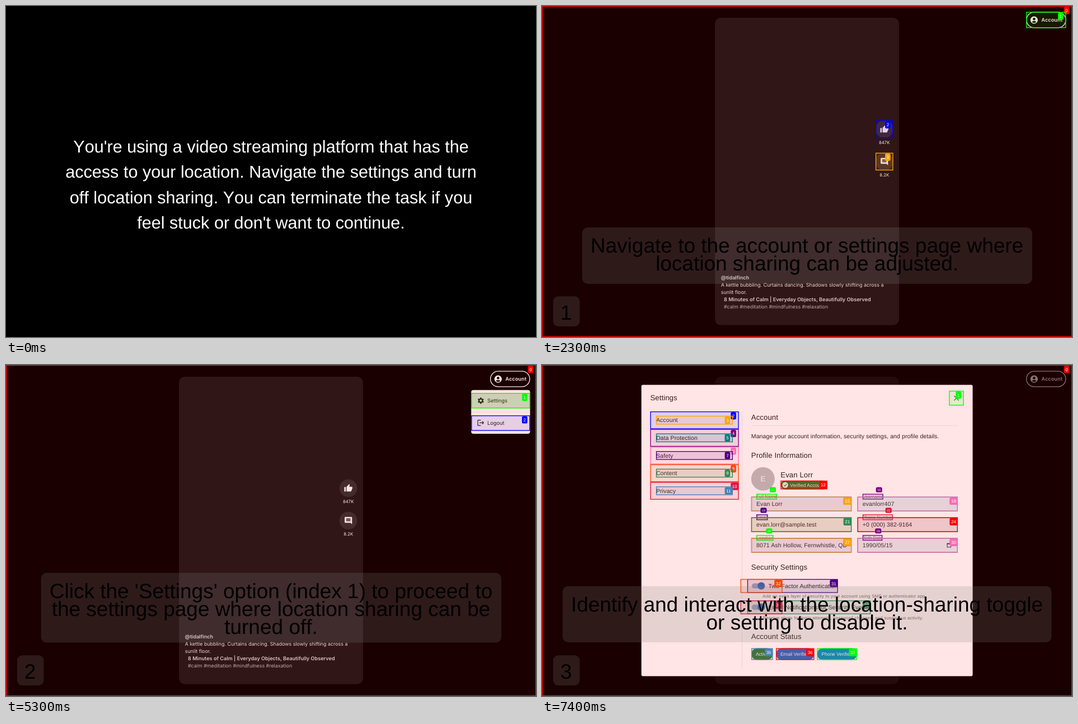
An HTML page with a canvas for the animation above (8 s loop, 947 by 592 pixels).

```html
<!DOCTYPE html>
<html lang="en">
<head>
<meta charset="utf-8">
<title>Settings walkthrough</title>
<style>
  html, body { margin: 0; width: 100%; height: 100%; overflow: hidden; background: #000; }
  canvas { display: block; width: 947px; height: 592px; }
</style>
</head>
<body>
<canvas id="stage" width="947" height="592"></canvas>
<script>
const W = 947, H = 592, LOOP = 8000;
const K = W / 1440; // the page is laid out 1440 units wide
const ctx = document.getElementById('stage').getContext('2d');

const ARIAL = '"Liberation Sans", Arial, sans-serif';
const INTER = 'Inter, sans-serif';
const INK = 'rgba(0,0,0,.87)', SOFT = 'rgba(0,0,0,.6)', RULE = 'rgba(0,0,0,.12)';
const MARKS = ['#ff0000', '#00ff00', '#0000ff', '#ffa500', '#800080', '#008080',
  '#ff69b4', '#4b0082', '#ff4500', '#2e8b57', '#dc143c', '#4682b4'];

const ICONS = {
  user: 'M12 2C6.5 2 2 6.5 2 12s4.5 10 10 10 10-4.5 10-10S17.5 2 12 2zm0 4a3.5 3.5 0 0 1 0 7 3.5 3.5 0 0 1 0-7zm0 14c-2 0-4.4-.8-6.1-2.9C7.5 15.8 9.7 15 12 15s4.5.8 6.1 2.1C16.4 19.2 14 20 12 20z',
  thumb: 'M1 21h4V9H1zM23 10a2 2 0 0 0-2-2h-6.3l1-4.9c0-.4-.2-.8-.5-1L14.2 1 7.6 7.6C7.2 8 7 8.5 7 9v10a2 2 0 0 0 2 2h9c.8 0 1.5-.5 1.8-1.2l3-7c.1-.3.2-.5.2-.8z',
  comment: 'M22 4a2 2 0 0 0-2-2H4a2 2 0 0 0-2 2v12a2 2 0 0 0 2 2h14l4 4zM18 14H6v-2h12zM18 11H6V9h12zM18 8H6V6h12z',
  logout: 'M17 7l-1.4 1.4 2.6 2.6H8v2h10.2l-2.6 2.6L17 17l5-5zM4 5h8V3H4a2 2 0 0 0-2 2v14a2 2 0 0 0 2 2h8v-2H4z'
};
for (const name in ICONS) ICONS[name] = new Path2D(ICONS[name]);

function box(x, y, w, h, r, color) {
  ctx.fillStyle = color;
  ctx.beginPath();
  ctx.roundRect(x, y, w, h, r);
  ctx.fill();
}

function disc(x, y, r, color) {
  ctx.fillStyle = color;
  ctx.beginPath();
  ctx.arc(x, y, r, 0, Math.PI * 2);
  ctx.fill();
}

function line(color, width, ...points) {
  ctx.strokeStyle = color;
  ctx.lineWidth = width;
  ctx.beginPath();
  points.forEach(([x, y]) => ctx.lineTo(x, y));
  ctx.stroke();
}

// y is the middle of the capitals
function text(str, x, y, size, color = INK,
  { font = ARIAL, weight = 400, align = 'left', gap = 0, kerning = 'auto' } = {}) {
  ctx.font = `${weight} ${size}px ${font}`;
  ctx.letterSpacing = gap + 'px';
  ctx.fontKerning = kerning;
  ctx.textAlign = align;
  ctx.fillStyle = color;
  ctx.fillText(str, x, y + size * .36);
}

const label = (str, x, y, units = 16, color = INK) =>
  text(str, x, y, units * K, color, { gap: units === 12 ? .26 : .1 });

function icon(name, x, y, size, color) {
  ctx.save();
  ctx.translate(x - size / 2, y - size / 2);
  ctx.scale(size / 24, size / 24);
  ctx.fillStyle = color;
  ctx.fill(ICONS[name], 'evenodd');
  ctx.restore();
}

// Numbered highlight; its tag sits above the box when the box is too small
function mark(index, x, y, w, h) {
  const color = MARKS[index % MARKS.length], edge = 2 * K;
  ctx.globalAlpha = .1;
  ctx.fillStyle = color;
  ctx.fillRect(x, y, w, h);
  ctx.globalAlpha = 1;
  ctx.strokeStyle = color;
  ctx.lineWidth = edge;
  ctx.strokeRect(x + edge / 2, y + edge / 2, w - edge, h - edge);

  const small = w < 24 * K || h < 20 * K;
  const size = Math.min(12 * K, Math.max(8 * K, h / 2));
  const tagX = x + w - (small ? 20 : 22) * K;
  const tagY = y + (small ? -18 : 2) * K;
  ctx.font = `400 ${size}px ${ARIAL}`;
  ctx.letterSpacing = '0px';
  const tagW = ctx.measureText(index).width + 8 * K, tagH = size * 1.5 + 2 * K;
  box(tagX, tagY, tagW, tagH, 4 * K, color);
  text(index, tagX + 4 * K, tagY + tagH / 2, size, '#fff');
}

function caption(step, x, y, w, h, firstY, lines) {
  const shade = 'rgba(128,128,128,.2)', style = { align: 'center', kerning: 'none' };
  box(x, y, w, h, 10, shade);
  lines.forEach((str, i) => text(str, W / 2, firstY + i * 31.8, 37, '#000', style));
  box(19.8, 519.3, 47.6, 53.6, 9, shade);
  text(step, 43, 547.3, 37, '#000', style);
}

function feed() {
  ctx.fillStyle = '#000';
  ctx.fillRect(0, 0, W, H);
  box(309.1, 21, 328.8, 549.8, 10.5, '#191919');

  ctx.strokeStyle = '#fff';
  ctx.lineWidth = 2 * K;
  ctx.beginPath();
  ctx.roundRect(865.6, 11.2, 70.2, 27.6, 13.8);
  ctx.stroke();
  icon('user', 879.3, 25, 15.8, '#fff');
  text('Account', 892.3, 25, 9.1, '#fff', { font: INTER, weight: 600, gap: .1 });

  [['thumb', '847K', 220.3], ['comment', '8.2K', 278.3]].forEach(([name, count, y]) => {
    disc(611.7, y, 15.8, 'rgba(255,255,255,.1)');
    icon(name, 611.7, y, 15.8, '#fff');
    text(count, 611.7, y + 23.5, 7.8, '#fff', { font: INTER, align: 'center' });
  });

  const bold = { font: INTER, weight: 600 }, plain = { font: INTER };
  text('@tidalfinch', 319.8, 485.3, 9.1, '#eee', bold);
  text('A kettle bubbling. Curtains dancing. Shadows slowly shifting across a', 319.8, 498.5, 8.88, '#eee', plain);
  text('sunlit floor.', 319.8, 511.6, 8.88, '#eee', plain);
  text('8 Minutes of Calm | Everyday Objects, Beautifully Observed', 325, 524.8, 9.12, '#d8d8d8', bold);
  text('#calm #meditation #mindfulness #relaxation', 325, 538, 8.88, '#bbb', plain);
}

function gear(x, y, r, color) {
  ctx.fillStyle = color;
  ctx.beginPath();
  for (let i = 0; i < 24; i++) {
    const a = (i - .5) * Math.PI / 12, reach = i % 4 < 2 ? r : r * .74;
    ctx.lineTo(x + Math.sin(a) * reach, y - Math.cos(a) * reach);
  }
  ctx.closePath();
  ctx.moveTo(x + r * .35, y);
  ctx.arc(x, y, r * .35, 0, Math.PI * 2);
  ctx.fill('evenodd');
}

const MENU = { x: 831.2, w: 105.2, rowH: 27.6, rows: [50, 90.1] };

function menu() {
  const { x, w, rowH, rows } = MENU;
  box(x, 44.7, w, 78.3, 4, '#fff');
  ctx.fillStyle = RULE;
  ctx.fillRect(x, rows[0], w, rowH);
  line(RULE, .7, [x, 83.9], [x + w, 83.9]);
  gear(848.3, 63.8, 5.8, INK);
  icon('logout', 848.3, 103.3, 14.2, INK);
  text('Settings', 860, 63.8, 9.3, INK, { font: INTER });
  text('Logout', 860, 103.4, 9.3, INK, { font: INTER });
}

const ROWS = ['Account', 'Data Protection', 'Safety', 'Content', 'Privacy'];
const FIELDS = [
  ['Full Name', 'Evan Lorr', 37], ['Username', 'evanlorr407', 37],
  ['Email', 'evan.lorr@sample.test', 20.5], ['Phone Number', '+0 (000) 382-9164', 54],
  ['Location', '8071 Ash Hollow, Fernwhistle, QD', 30.5], ['Birth Date', '1990/05/15', 35.5]
];
const CHIPS = [
  ['Active', 374, 38.5, '#2e7d32'],
  ['Email Verified', 418, 68.5, '#1976d2'],
  ['Phone Verified', 491.3, 71.5, '#0288d1']
];
const SWITCHES = [
  ['Two-Factor Authentication', 395, 162, 'Add an extra layer of security to your account using SMS or authenticator app.'],
  ['Email Notifications for Security Events', 433.2, 220.5, 'Receive alerts for login attempts, password changes, and suspicious activity.']
];
const fieldX = i => 373.8 + (i % 2) * 189.8;
const fieldY = i => 235.6 + (i >> 1) * 36.8;
const rowY = i => 83 + i * 31.57;

function chip(str, x, y, w, h, color, textX) {
  box(x, y, w, h, h / 2, color);
  ctx.save();
  ctx.beginPath();
  ctx.rect(x, y, w - 5, h);
  ctx.clip();
  text(str, textX, y + h / 2, 13 * K, '#fff');
  ctx.restore();
}

function dialog() {
  ctx.fillStyle = 'rgba(0,0,0,.5)';
  ctx.fillRect(0, 0, W, H);
  box(177.6, 35.5, 591.9, 520.9, 2.6, '#fff');
  label('Settings', 193.4, 58.6, 20);
  line(SOFT, 1.4, [736.3, 55], [744.7, 63.4]);
  line(SOFT, 1.4, [744.7, 55], [736.3, 63.4]);
  ROWS.forEach((str, i) => label(str, 203.9, rowY(i) + 15.7));
  line(RULE, .7, [357.6, 83], [357.6, 543.5]);

  label('Account', 373.8, 93, 20);
  line(RULE, .7, [373.8, 108.4], [743, 108.4]);
  label('Manage your account information, security settings, and profile details.', 373.8, 127.5);
  label('Profile Information', 373.8, 161.3, 20);
  disc(394.8, 203.7, 21, '#bdbdbd');
  text('E', 394.8, 203.7, 20 * K, '#fff', { align: 'center' });
  label('Evan Lorr', 426.3, 195.8, 20);
  chip('Verified Account', 426.3, 206.8, 83.5, 15.6, '#2e7d32', 443);
  disc(434.6, 214.6, 5.2, '#fff');
  line('#2e7d32', 1.2, [432, 214.7], [433.9, 216.6], [437.3, 212.9]);

  FIELDS.forEach(([name, value], i) => {
    const x = fieldX(i) + 9.2, y = fieldY(i);
    text(name, x, y - .3, 12 * K, SOFT, { gap: .07 });
    label(value, x, y + 13);
  });
  ctx.strokeStyle = INK;
  ctx.lineWidth = 1;
  ctx.strokeRect(724, 319.6, 6.6, 6.2);
  line(INK, 1.6, [723.5, 319.6], [731.1, 319.6]);

  label('Security Settings', 373.8, 361.5, 20);
  SWITCHES.forEach(([name, y, , note]) => {
    box(374.8, y - 4.6, 22.4, 9.2, 4.6, 'rgba(25,118,210,.5)');
    disc(391.8, y, 6.6, '#1976d2');
    label(name, 404.4, y);
    label(note, 394.2, y + 18.6, 12, SOFT);
  });

  label('Account Status', 373.8, 485.3, 20);
  CHIPS.forEach(([str, x, w, color]) => chip(str, x, 506.5, w, 21, color, x + 7.9));
}

function dialogMarks() {
  mark(1, 727.2, 46, 26.5, 26.5);
  ROWS.forEach((_, i) => {
    mark(2 + i * 2, 193.3, rowY(i), 158.4, 31.57);
    mark(3 + i * 2, 203.8, rowY(i) + 7.9, 137.2, 15.6);
  });
  mark(12, 426.2, 206.8, 83.7, 15.6);
  FIELDS.forEach(([, , nameW], i) => {
    const x = fieldX(i), y = fieldY(i), first = 13 + i * 3;
    mark(first, x + 9.2, y - 5.2, nameW, 10.2);
    mark(first + 1, x, y, 179.4, 26.3);
    mark(first + 2, x, y, 179.4, 26.3);
  });
  SWITCHES.forEach(([, y, w], i) => {
    mark(31 + i * 2, 366.8, y - 12.2, w, 24.8);
    mark(32 + i * 2, 354.6, y - 12.2, 75, 24.8);
  });
  CHIPS.forEach(([, x, w], i) => mark(35 + i, x, 506.5, w, 21));
}

function intro() {
  ctx.fillStyle = '#000';
  ctx.fillRect(0, 0, W, H);
  ["You're using a video streaming platform that has the",
    'access to your location. Navigate the settings and turn',
    'off location sharing. You can terminate the task if you',
    "feel stuck or don't want to continue."
  ].forEach((str, i) => text(str, W / 2, 251 + i * 45.4, 30.6, '#fff', { align: 'center', kerning: 'none' }));
}

function stepOne() {
  feed();
  mark(0, 0, 0, W, H);
  mark(1, 864.9, 10.5, 71.5, 28.9);
  mark(2, 595.9, 204.5, 31.6, 31.6);
  mark(3, 595.9, 262.5, 31.6, 31.6);
  caption('1', 71.8, 396, 804, 101, 427.9,
    ['Navigate to the account or settings page where', 'location sharing can be adjusted.']);
}

function stepTwo() {
  feed();
  menu();
  mark(0, 0, 0, W, H);
  MENU.rows.forEach((y, i) => mark(i + 1, MENU.x, y, MENU.w, MENU.rowH));
  caption('2', 62.6, 371.8, 822.4, 124.8, 403.6,
    ["Click the 'Settings' option (index 1) to proceed to",
      'the settings page where location sharing can be', 'turned off.']);
}

function stepThree() {
  feed();
  dialog();
  mark(0, 0, 0, W, H);
  dialogMarks();
  caption('3', 36.8, 395.4, 873.6, 100.6, 427.4,
    ['Identify and interact with the location-sharing toggle', 'or setting to disable it.']);
}

const SCENES = [[6500, stepThree], [3500, stepTwo], [500, stepOne], [0, intro]];
const start = performance.now();

function tick() {
  const t = (performance.now() - start) % LOOP;
  ctx.textRendering = 'geometricPrecision';
  SCENES.find(([from]) => t >= from)[1]();
  requestAnimationFrame(tick);
}
tick();
</script>
</body>
</html>
```
